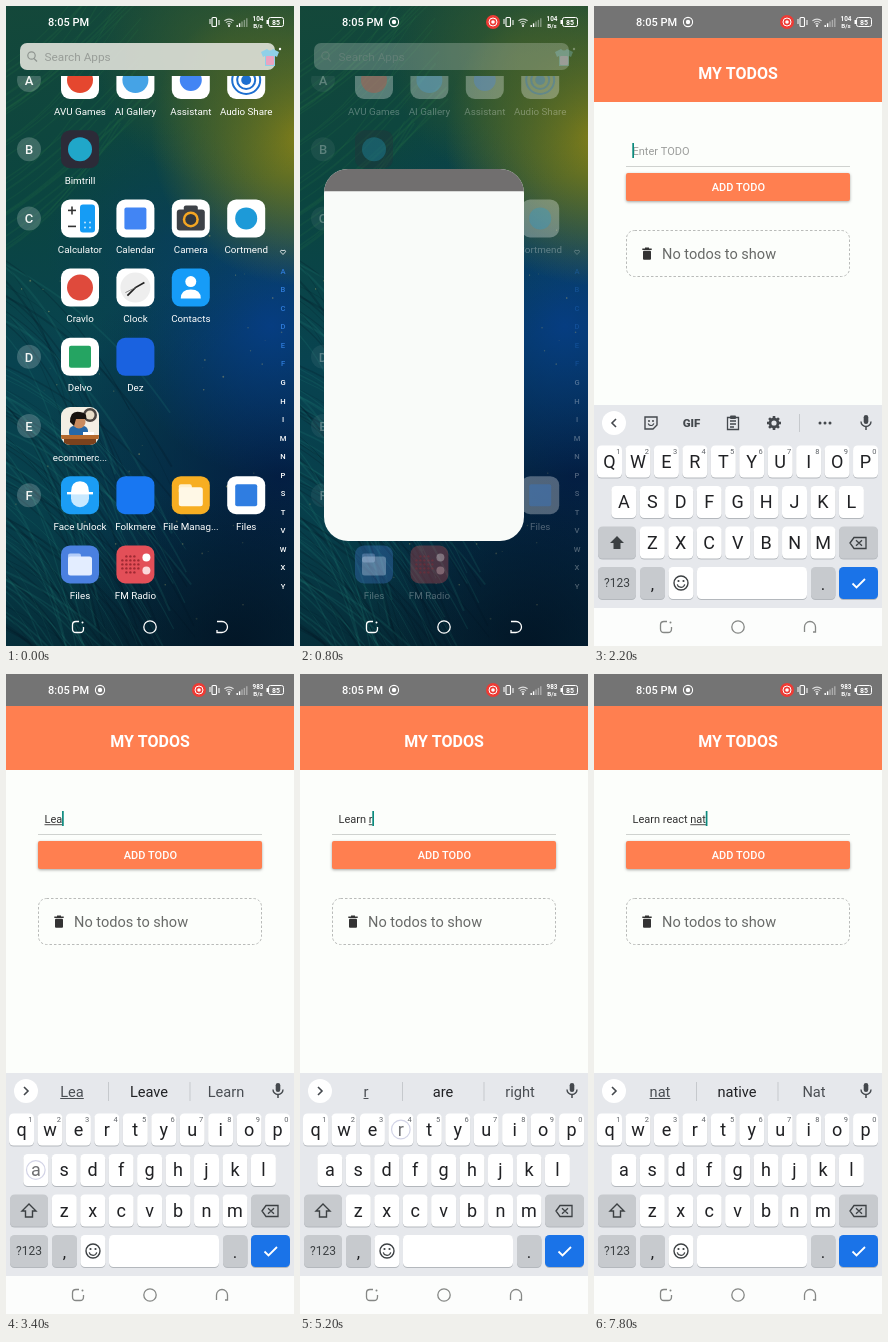
Animation of 288 by 640 pixels, one loop 8000 ms. Source, as an HTML page with a canvas:

```html
<!DOCTYPE html>
<html lang="en">
<head>
<meta charset="utf-8">
<title>Todo app</title>
<style>
html, body { margin: 0; width: 288px; height: 640px; overflow: hidden; background: #fcfefb; }
canvas { display: block; width: 288px; height: 640px; }
</style>
</head>
<body>
<canvas id="stage"></canvas>
<script>
const W = 288, H = 640, LOOP = 8000, STEP = 200;
const CORAL = '#ff7f50', INK = '#202124';
const stage = document.getElementById('stage');
const dpr = window.devicePixelRatio || 1;
stage.width = W * dpr;
stage.height = H * dpr;
let c = stage.getContext('2d');
c.scale(dpr, dpr);

function text(s, x, y, size, color, weight = 400, align = 'left') {
  c.font = `${weight} ${size}px Roboto, sans-serif`;
  c.textAlign = align;
  c.fillStyle = color;
  c.fillText(s, x, y);
  return c.measureText(s).width;
}
const mid = (s, x, y, size, color, weight) => text(s, x, y, size, color, weight, 'center');
function rect(x, y, w, h, color, r = 0) {
  c.fillStyle = color;
  c.beginPath();
  c.roundRect(x, y, w, h, r);
  c.fill();
}
function disc(x, y, r, color) {
  c.fillStyle = color;
  c.beginPath();
  c.arc(x, y, r, 0, 7);
  c.fill();
}
function ring(x, y, r, color, w = 1, a = 0, b = 7) {
  c.strokeStyle = color;
  c.lineWidth = w;
  c.beginPath();
  c.arc(x, y, r, a, b);
  c.stroke();
}
function line(pts, color, w = 1) {
  c.strokeStyle = color;
  c.lineWidth = w;
  c.beginPath();
  for (let i = 0; i < pts.length; i += 2) c.lineTo(pts[i], pts[i + 1]);
  c.stroke();
}
function path(d, color, x = 0, y = 0, w = 0) {
  c.save();
  c.translate(x, y);
  const p = new Path2D(d);
  if (w) { c.strokeStyle = color; c.lineWidth = w; c.stroke(p); }
  else { c.fillStyle = color; c.fill(p); }
  c.restore();
}

// ---------- wallpaper ----------
const paper = document.createElement('canvas');
function paintPaper() {
  paper.width = W * dpr;
  paper.height = H * dpr;
  const main = c;
  c = paper.getContext('2d');
  c.scale(dpr, dpr);
  const base = c.createLinearGradient(0, 0, 90, H);
  [[0, '#14483a'], [.3, '#0b4540'], [.55, '#084350'], [.8, '#073e4a'], [1, '#052c38']]
    .forEach(([k, col]) => base.addColorStop(k, col));
  c.fillStyle = base;
  c.fillRect(0, 0, W, H);
  const glow = (x, y, r, rgb, a) => {
    const g = c.createRadialGradient(x, y, 0, x, y, r);
    g.addColorStop(0, `rgba(${rgb},${a})`);
    g.addColorStop(1, `rgba(${rgb},0)`);
    c.fillStyle = g;
    c.fillRect(0, 0, W, H);
  };
  glow(275, 470, 240, '3,28,66', .95);
  glow(265, 320, 150, '6,62,135', .9);
  glow(160, 235, 120, '8,60,95', .6);
  glow(295, 130, 150, '140,132,22', .95);
  glow(220, 50, 130, '70,96,40', .7);
  glow(230, 640, 170, '2,18,34', .8);
  let seed = 11;
  const rnd = () => (seed = seed * 16807 % 2147483647) / 2147483647;
  for (let i = 0; i < 90; i++) {
    const y = 250 + rnd() * 370, x = 70 + rnd() * 120;
    c.strokeStyle = i % 2 ? 'rgba(42,138,122,.16)' : 'rgba(0,20,32,.22)';
    c.lineWidth = .6 + rnd() * 1.6;
    c.beginPath();
    c.moveTo(-8, y);
    c.quadraticCurveTo(x * .55, y + 45, x, y + 150 + rnd() * 90);
    c.stroke();
  }
  for (let i = 0; i < 26; i++) {
    c.strokeStyle = 'rgba(50,130,75,.13)';
    c.lineWidth = 1 + rnd();
    const y = 60 + rnd() * 190;
    c.beginPath();
    c.moveTo(-5, y);
    c.quadraticCurveTo(60, y - 40, 100 + rnd() * 50, y - 130);
    c.stroke();
  }
  for (let i = 0; i < 60; i++)
    disc(rnd() * W, 200 + rnd() * 420, .3 + rnd() * .7, `rgba(190,180,110,${.15 + rnd() * .4})`);
  c = main;
}

// ---------- app icons, each drawn around 0,0 ----------
const tile = color => rect(-19, -19, 38, 38, color, 9);
const dot = (color, back = '#fff', r = 11) => () => { tile(back); disc(0, 0, r, color); };
const block = (color, back = '#fff') => () => { tile(back); rect(-11, -11, 22, 22, color, 2); };
const plain = color => () => tile(color);
const folder = (back, dark, light) => () => {
  tile(back);
  rect(-12, -11, 13, 9, dark, 2);
  rect(-12, -8, 24, 19, light, 2.5);
};
function calculator() {
  tile('#fff');
  line([-12, -8, -4, -8], '#333', 1.6);
  line([-8, -12, -8, -4], '#333', 1.6);
  line([-12, 8, -4, 8], '#333', 1.6);
  rect(0, -14, 15, 28, '#159cf5', 3);
  for (let i = 0; i < 4; i++) disc(5 + i % 2 * 5, 4 + (i >> 1) * 5, 1, '#bfe4ff');
}
function camera() {
  tile('#fff');
  rect(-14, -9, 28, 21, '#3d4147', 3);
  rect(-7, -13, 14, 6, '#3d4147', 2);
  disc(0, 1, 8, '#f5a623');
  disc(0, 1, 5.5, '#33373d');
}
function clock() {
  tile('#fff');
  disc(0, 0, 15, '#eeeeee');
  line([-8, 8, 0, 0, 9, -5], '#222', 1.7);
  line([0, 0, -10, 5], '#777', .8);
}
function contacts() {
  tile('#169cf8');
  disc(0, -6, 5.5, '#fff');
  path('M-10 11 Q-10 2 0 2 Q10 2 10 11 Z', '#fff');
}
function student() {
  tile('#f4efe4');
  c.save();
  c.beginPath();
  c.roundRect(-19, -19, 38, 38, 9);
  c.clip();
  disc(10, -11, 7, '#4b4440');
  disc(10, -11, 4.5, '#e9ddc8');
  rect(-11, 0, 19, 12, '#2468a8', 5);
  disc(-1, -4, 6.5, '#c98b5f');
  path('M-10 -4 Q-10 -16 0 -14 Q8 -13 6 -7 L-4 -7 L-6 0 Z', '#17120f');
  rect(-19, 9, 38, 4, '#b56a2d');
  rect(-16, 13, 32, 8, '#7b421d');
  rect(3, 6, 11, 3, '#fff');
  c.restore();
}
function faceUnlock() {
  tile('#1b9df5');
  rect(-9, -9, 18, 21, '#c9e9ff', 9);
  path('M-9 -3 Q-9 -14 0 -14 Q9 -14 9 -3 Z', '#fff');
  line([-13, -2, 13, -2], '#fff', 2.4);
}
function radio() {
  tile('#e34f58');
  for (let i = 0; i < 25; i++) {
    const x = i % 5, y = i / 5 | 0;
    if ((x % 4) || (y % 4)) disc(-13 + x * 4, -8 + y * 4, 1.2, '#9e2932');
  }
  disc(11, -7, 4, '#fff');
  disc(11, 6, 4, '#fbd9db');
}
function audio() {
  tile('#fff');
  ring(0, 0, 14, '#1e6fd0', 2);
  ring(0, 0, 9, '#1e6fd0', 2);
  disc(0, 0, 5, '#1e6fd0');
}

const rows = [
  ['A', ['AVU Games', dot('#e5472f', '#fff', 13)], ['AI Gallery', dot('#45a3e6', '#fff', 13)],
    ['Assistant', dot('#4285f4')], ['Audio Share', audio]],
  ['B', ['Bimtrill', dot('#20a7c9', '#2c2b38', 12)]],
  ['C', ['Calculator', calculator], ['Calendar', block('#4285f4')], ['Camera', camera],
    ['Cortmend', dot('#1d9ad8')]],
  ['', ['Cravlo', dot('#df4a3c', '#fff', 13)], ['Clock', clock], ['Contacts', contacts]],
  ['D', ['Delvo', block('#25a462')], ['Dez', plain('#1a62e0')]],
  ['E', ['ecommerc...', student]],
  ['F', ['Face Unlock', faceUnlock], ['Folkmere', plain('#1877f2')],
    ['File Manag...', folder('#f7ae22', '#fff0cc', '#fff8e6')], ['Files', block('#2f7de1')]],
  ['', ['Files', folder('#4a80e0', '#b5cdf8', '#e3edff')], ['FM Radio', radio]]
];

function statusBar(recording, speed) {
  const ink = '#fff';
  text('8:05 PM', 42, 20, 11, ink, 500);
  if (recording) {
    ring(94, 16, 4.6, ink, 1.1);
    disc(94, 16, 2.2, ink);
    disc(193, 16, 7, '#ee3b35');
    ring(193, 16, 4, ink, 1);
    disc(193, 16, 1.8, ink);
  }
  c.strokeStyle = ink;
  c.lineWidth = 1.1;
  c.beginPath();
  c.roundRect(206, 11.5, 4.5, 9, 1);
  c.stroke();
  line([204, 13, 204, 18], ink);
  line([213, 14, 213, 19], ink);
  for (let i = 1; i < 4; i++) ring(223, 20, i * 2.3, 'rgba(255,255,255,.75)', 1.1, -2.3, -.84);
  disc(223, 20, 1, ink);
  for (let i = 0; i < 5; i++)
    rect(230.5 + i * 2.4, 19 - i * 1.7, 1.4, 2 + i * 1.7, i < 2 ? ink : 'rgba(255,255,255,.4)');
  mid(speed, 252, 15, 6.4, ink, 700);
  mid('B/s', 252, 22, 6.2, ink, 700);
  c.strokeStyle = ink;
  c.lineWidth = 1;
  c.beginPath();
  c.roundRect(262.5, 11.5, 15, 9, 2);
  c.stroke();
  rect(260.5, 14, 1.5, 4, ink);
  mid('85', 270, 18.7, 7, ink, 700);
}

function navBar(color, lowered) {
  path('M1 -5.5 H-2 Q-5.5 -5.5 -5.5 -2 V2 Q-5.5 5.5 -2 5.5 H2 Q5.5 5.5 5.5 2 V0', color, 72, 621, 1.3);
  disc(76.5, 616.5, 1, color);
  ring(144, 621, 6.2, color, 1.3);
  c.save();
  c.translate(216, 621);
  if (lowered) c.rotate(-Math.PI / 2);
  path('M-5 -5.5 H0 A5.5 5.5 0 0 1 0 5.5 H-5 V3', color, 0, 0, 1.3);
  c.restore();
}

function home(alpha) {
  c.drawImage(paper, 0, 0, W, H);
  c.globalAlpha = alpha * .9;
  rect(14, 37, 255, 27, '#dfe2da', 7);
  c.globalAlpha = alpha;
  ring(25.5, 49.5, 3.7, '#8f9590', 1.2);
  line([28, 52.5, 31, 55.5], '#8f9590', 1.2);
  text('Search Apps', 38.5, 55, 11.8, '#989d98');
  path('M-9 -5 L-3 -8 Q0 -5 3 -8 L9 -5 L7 0 L5 -1 V9 H-5 V-1 L-7 0 Z', '#8fd0e8', 264, 51);
  rect(260, 50, 8, 9, '#eba3c0', 1);
  disc(274, 43, 1.2, '#fff');
  c.save();
  c.beginPath();
  c.rect(0, 70, W, H);
  c.clip();
  rows.forEach(([letter, ...apps], i) => {
    const y = 74 + i * 69.2;
    if (letter) {
      disc(23, y, 12, 'rgba(255,255,255,.2)');
      mid(letter, 23, y + 4.8, 13, '#f2f5f3', 500);
    }
    apps.forEach(([name, draw], j) => {
      const x = 74 + j * 55.4;
      c.save();
      c.translate(x, y);
      draw();
      c.restore();
      mid(name, x, y + 34.5, 9.8, '#fff');
    });
  });
  c.restore();
  path('M0 2.5 L-2.6 -.3 Q-2.4 -2.8 0 -1.3 Q2.4 -2.8 2.6 -.3 Z', '#fff', 277, 246, .8);
  [...'ABCDEFGHIMNPSTVWXY'].forEach((s, i) =>
    mid(s, 277, 267.8 + i * 18.53, 7.6, i < 6 ? '#2f7bd8' : '#fff', 500));
  c.globalAlpha = 1;
}

// ---------- keyboard and typing ----------
const keyAt = { ' ': [185, 600] };
['qwertyuiop', 'asdfghjkl', 'zxcvbnm'].forEach((row, r) =>
  [...row].forEach((k, i) => keyAt[k] = [15.5 + [0, 14.3, 42.8][r] + i * 28.45, 455.5 + r * 40.5]));

const presses = [[2600, 'L'], [3000, 'e'], [3200, 'a'], [3600, 'r'], [3800, 'n'], [4200, ' '],
  [5000, 'r'], [5400, 'e'], [5600, 'a'], [6000, 'c'], [6400, 't'], [6800, ' '],
  [7000, 'n'], [7200, 'a'], [7400, 't']];
const hints = ['', 'L Let Like', 'Le Let Lets', 'Lea Leave Learn', 'Lear Learn Learning',
  'Learn Learning Learned', 'how to about', 'r are right', 're really the', 'rea read really',
  'reac reach reaction', 'react reaction reacted', 'native to and', 'n and now',
  'na native name', 'nat native Nat'];

function key(x, y, w, color) {
  rect(x, y + 1, w, 32, '#b4b8bd', 4.5);
  rect(x, y, w, 32, color, 4.5);
}
function mic() {
  rect(269.7, 409, 4.6, 9, '#44484d', 2.3);
  ring(272, 415.5, 5, '#44484d', 1.4, 0, Math.PI);
  line([272, 420.5, 272, 424], '#44484d', 1.5);
}
function toolbar() {
  const g = '#44484d';
  path('M-6 -6 H6 V2 L2 6 H-6 Z', g, 57, 417, 1.4);
  disc(55, 415, 1, g);
  disc(59, 415, 1, g);
  ring(57, 416.5, 3, g, 1.1, .3, 2.8);
  mid('GIF', 97.5, 421, 11.5, g, 900);
  path('M-5.5 -5.5 H5.5 V6.5 H-5.5 Z M-3 -2 H3 M-3 1 H3 M-3 4 H1', g, 139, 417, 1.3);
  rect(136, 409.5, 6, 3.5, g, 1);
  for (let i = 0; i < 8; i++) {
    const a = i * Math.PI / 4, x = Math.cos(a), y = Math.sin(a);
    line([180 + x * 4, 417 + y * 4, 180 + x * 7, 417 + y * 7], g, 2.6);
  }
  ring(180, 417, 4, g, 2.8);
  line([205.5, 408, 205.5, 426], '#c6c9cd');
  for (let i = -1; i < 2; i++) disc(231 + i * 5, 417, 1.5, g);
}
function suggestions(n) {
  line([102.5, 408, 102.5, 427], '#c6c9cd');
  line([184, 408, 184, 427], '#c6c9cd');
  const composing = n !== 6 && n !== 12;
  hints[n].split(' ').forEach((s, i) => {
    const x = [66, 143, 220][i], bold = composing && i === 1;
    mid(s, x, 422.5, 14.6, bold ? INK : '#4a4e53');
    if (composing && !i) {
      const w = c.measureText(s).width;
      rect(x - w / 2, 424, w, 1, '#4a4e53');
    }
  });
}
function keyboard(n) {
  rect(0, 399, W, 203, '#e6e8ec');
  disc(20, 417, 12, '#fff');
  const d = n ? 2 : -2;
  line([20 - d, 413, 20 + d, 417, 20 - d, 421], '#44484d', 1.6);
  if (n) suggestions(n); else toolbar();
  mic();
  for (const k in keyAt) {
    if (k === ' ') continue;
    const [x, y] = keyAt[k];
    key(x - 12.5, y - 16, 25, '#fff');
    mid(n ? k : k.toUpperCase(), x, y + 6.3, 18, INK);
    const num = 'qwertyuiop'.indexOf(k) + 1;
    if (num) mid(num % 10, x + 8.8, y - 7.5, 7.5, '#5f6368');
  }
  const grey = '#c7cace';
  key(4, 520.5, 38, grey);
  path('M0 -7 L7 0 H3.5 V6 H-3.5 V0 H-7 Z', '#3c4043', 23, 537, n ? 1.4 : 0);
  key(245, 520.5, 39, grey);
  path('M-8 0 L-4 -5.5 H8 V5.5 H-4 Z M-2 -2.7 L4 2.7 M4 -2.7 L-2 2.7', '#3c4043', 264, 537, 1.3);
  key(4, 561, 38, grey);
  mid('?123', 23, 581, 12, '#3c4043');
  key(46, 561, 25, grey);
  mid(',', 58.5, 584, 17, INK);
  key(74.5, 561, 25, '#fff');
  ring(87, 577, 7, '#3c4043', 1.4);
  disc(84.5, 575, 1.1, '#3c4043');
  disc(89.5, 575, 1.1, '#3c4043');
  ring(87, 577.5, 3.8, '#3c4043', 1.3, .2, 2.94);
  key(103, 561, 110, '#fff');
  key(217, 561, 24.5, grey);
  mid('.', 229, 584, 17, INK);
  key(245, 561, 39, '#1a73e8');
  line([258.5, 577.5, 262.5, 581.5, 271, 573], '#fff', 1.8);
}

function touch(x, y, alpha) {
  c.globalAlpha = alpha;
  disc(x, y, 9.5, 'rgba(255,255,255,.5)');
  ring(x, y, 9.3, '#bfc1dc', 1.2);
  c.globalAlpha = 1;
}

function field(n, focused) {
  const typed = presses.slice(0, n).map(p => p[1]).join('');
  if (!n) text('Enter TODO', 38.5, 149, 11, '#9b9d9b');
  const w = n ? text(typed, 38.5, 149, 11, '#333') : 0;
  const start = typed.lastIndexOf(' ') + 1;
  if (start < typed.length) {
    const x = c.measureText(typed.slice(0, start)).width;
    rect(38.5 + x, 150.3, w - x, .9, '#333');
  }
  if (focused) rect(38.3 + w, 137, 1.7, 15, '#0b8a7d');
  line([32, 160.5, 256, 160.5], '#cfd2cf');
}

function todoApp(t) {
  const n = presses.filter(p => t >= p[0] + STEP).length;
  rect(0, 0, W, H, '#fcfefb');
  rect(0, 0, W, 32, '#747474');
  rect(0, 32, W, 64, CORAL);
  mid('MY TODOS', 144, 73.3, 16, '#fff', 700);
  statusBar(true, t < 3200 ? '104' : '983');
  field(n, t >= 2000);
  c.save();
  c.shadowColor = 'rgba(0,0,0,.35)';
  c.shadowBlur = 3 * dpr;
  c.shadowOffsetY = dpr;
  rect(32, 167, 224, 28, CORAL, 2);
  c.restore();
  mid('ADD TODO', 144.3, 185.2, 11, '#fff', 500);
  c.strokeStyle = '#b9bbb9';
  c.lineWidth = 1;
  c.setLineDash([2.5, 2]);
  c.beginPath();
  c.roundRect(32.5, 224.5, 223, 46, 8);
  c.stroke();
  c.setLineDash([]);
  rect(48.3, 242.5, 9.4, 1.5, '#333');
  rect(51, 241.5, 4, 1.5, '#333');
  rect(49, 244.8, 8, 9, '#333', 1);
  text('No todos to show', 68, 253.2, 14.55, '#686a68');

  const open = t >= 2200 ? 1 : t >= 2000 ? .5 : 0;
  if (open) {
    c.save();
    c.translate(0, (1 - open) * 203);
    keyboard(n);
    c.restore();
  }
  rect(0, 602, W, 38, open ? '#fcfdfc' : '#eeefee');
  navBar('#858785', open > 0);
  if (t === 1800) touch(205, 150, 1);
  for (const [at, k] of presses) {
    const age = t - at;
    if (age < 0 || age > STEP) continue;
    const [x, y] = keyAt[k.toLowerCase()];
    touch(x, y, !age ? 1 : k === ' ' ? .25 : .7);
  }
}

// ---------- app launch: window x, y, w, h and home opacity ----------
const opening = {
  600: [44, 290, 108, 174, .6],
  800: [24, 163, 200, 372, .3],
  1000: [5, 34, 274, 584, .1]
};

function draw(t) {
  if (t >= 1200) return todoApp(t);
  const win = opening[t];
  home(win ? win[4] : 1);
  if (win) {
    const [x, y, w, h] = win;
    c.save();
    c.beginPath();
    c.roundRect(x, y, w, h, 24 * Math.min(1, w / 200));
    c.clip();
    rect(x, y, w, h, '#f9fbf9');
    rect(x, y, w, 32 * w / W, '#716f6f');
    c.restore();
  } else if (t >= 200) {
    touch(74, 420, t === 200 ? 1 : .6);
  }
  statusBar(t >= 200, '104');
  navBar('#fff', false);
}

paintPaper();
let shown = -1;
const begin = performance.now();
function tick() {
  const now = Math.max(0, performance.now() - begin) % LOOP;
  const t = Math.floor(now / STEP) * STEP;
  if (t !== shown) draw(shown = t);
  requestAnimationFrame(tick);
}
tick();
</script>
</body>
</html>
```
